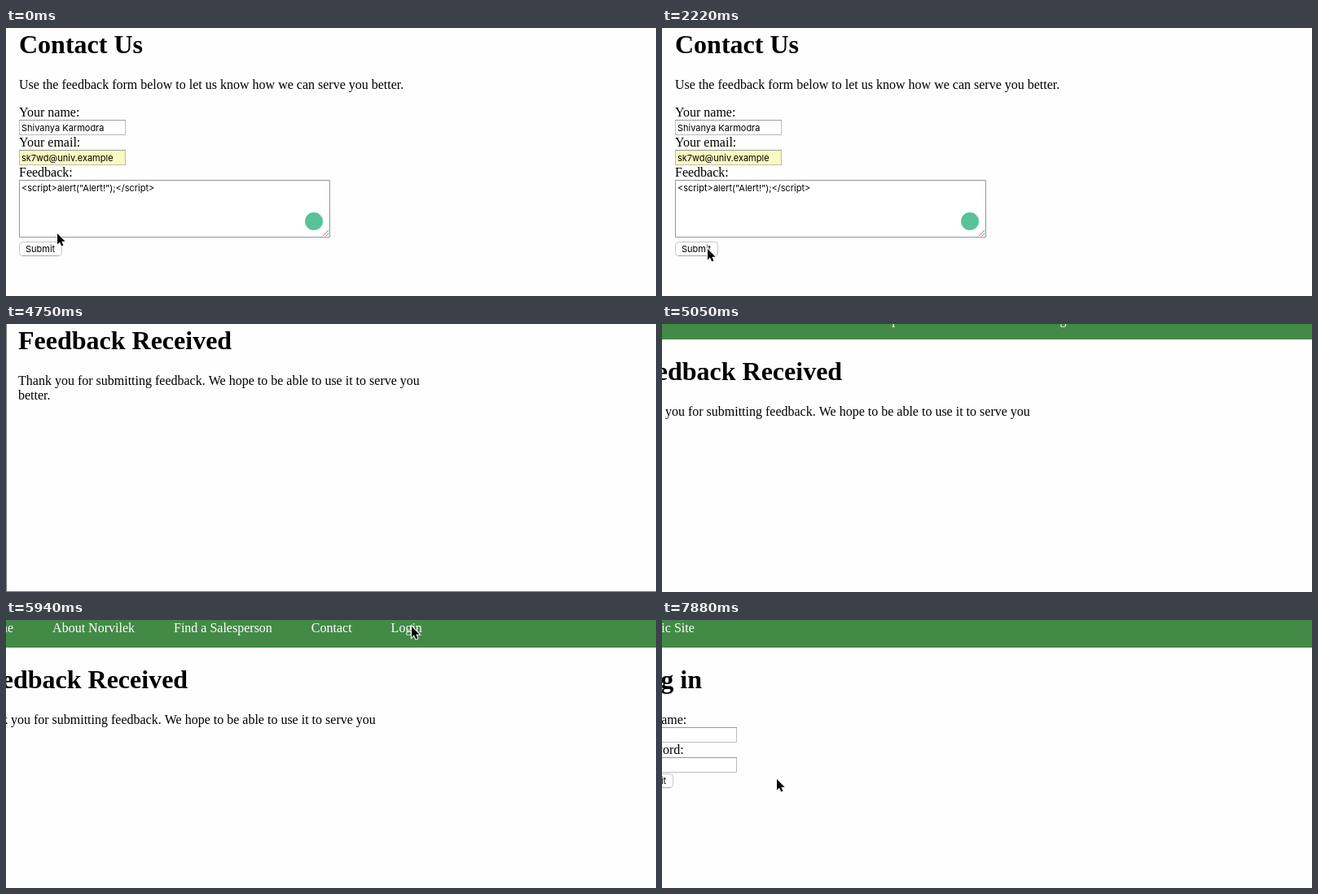
These frames come from a looping animation (798x330 px, 8000 ms). An HTML page with a canvas:

```html
<!DOCTYPE html>
<html lang="en">
<head>
<meta charset="utf-8">
<title>Feedback form</title>
<style>
html, body { margin: 0; height: 100%; overflow: hidden; background: #fefefe; }
canvas { display: block; }
</style>
</head>
<body>
<canvas id="stage" width="798" height="330"></canvas>
<script>
const ctx = document.getElementById('stage').getContext('2d');
const LOOP = 8000, TICK = 148.3;
const SERIF = '16px "Liberation Serif", serif';
const HEADING = 'bold 32px "Liberation Serif", serif';
const UI = '11px Inter, sans-serif';

// Keys are [tick, x, y]; positions change only on whole ticks.
const SCROLL = [[31, 0, 0], [32, -1, 0], [33, -30, 10], [34, -57, 38], [35, -56, 49], [36, -55, 53]];
const POINTER = [
  [0, 63, 253], [4, 56, 268], [9, 56, 268], [12, 60, 298], [15, 56, 272], [20, 56, 272],
  [21, 349, 89], [25, 318, 14], [35, 318, 14],
  [36, 483, 8], [38, 483, 8], [40, 498, 8], [44, 498, 8], [46, 479, 20], [50, 479, 20],
  [51, 300, 110], [53, 141, 196]
];

function at(keys, tick) {
  const next = keys.findIndex(key => key[0] > tick);
  if (next === 0) return keys[0].slice(1);
  if (next < 0) return keys[keys.length - 1].slice(1);
  const [t0, x0, y0] = keys[next - 1], [t1, x1, y1] = keys[next];
  const f = (tick - t0) / (t1 - t0);
  return [Math.round(x0 + (x1 - x0) * f), Math.round(y0 + (y1 - y0) * f)];
}

function text(string, x, y, font = SERIF, color = '#000') {
  ctx.font = font;
  ctx.fillStyle = color;
  ctx.fillText(string, x, y);
}

function box(x, y, w, h, fill, border, radius = 0) {
  ctx.beginPath();
  ctx.roundRect(x + .5, y + .5, w - 1, h - 1, radius);
  ctx.fillStyle = fill;
  ctx.fill();
  ctx.lineWidth = 1;
  ctx.strokeStyle = border;
  ctx.stroke();
}

function line(x0, y0, x1, y1, color) {
  ctx.beginPath();
  ctx.moveTo(x0, y0);
  ctx.lineTo(x1, y1);
  ctx.lineWidth = 1;
  ctx.strokeStyle = color;
  ctx.stroke();
}

function field(label, y, value = '', fill = '#fff') {
  text(label, 16, y);
  box(16, y + 4, 131, 19, fill, '#bcbcbc');
  line(16, y + 4.5, 147, y + 4.5, '#9a9a9a');
  text(value, 19, y + 18, UI);
}

function submitButton(y) {
  box(16, y, 53, 18, '#fff', '#c6c6c6', 4);
  line(20, y + 17.5, 65, y + 17.5, '#a9a9a9');
  text('Submit', 24, y + 13, UI);
}

function menu(items) {
  ctx.fillStyle = '#448a47';
  ctx.fillRect(-100, -119, 1000, 100);
  let x = 25;
  for (const item of items) {
    text(item, x, -38, SERIF, '#fff');
    x += ctx.measureText(item).width + 48;
  }
}

function feedbackArea(focused, caret) {
  if (focused) {
    [[3, '#dcebfb'], [2, '#9cc6f4']].forEach(([d, color]) =>
      box(16 - d, 187 - d, 382 + 2 * d, 71 + 2 * d, color, color, d));
  }
  box(16, 187, 382, 71, '#fff', focused ? '#4f97e6' : '#959595');
  if (focused) box(15, 186, 384, 73, 'transparent', '#5a9fe9', 1);
  const code = '<script>alert("Alert!");<\/script>';
  text(code, 19, 201, UI);
  if (caret) ctx.fillRect(Math.round(19 + ctx.measureText(code).width), 191, 1, 13);
  line(389, 256, 396, 249, '#888');
  line(393, 256, 396, 253, '#888');
  ctx.beginPath();
  ctx.arc(378, 238, 11, 0, 7);
  ctx.fillStyle = '#58c29b';
  ctx.fill();
}

function contactPage(tick) {
  text('Contact Us', 16, 31, HEADING);
  text('Use the feedback form below to let us know how we can serve you better.', 16, 75);
  field('Your name:', 109, 'Shivanya Karmodra');
  field('Your email:', 146, 'sk7wd@univ.example', '#f9f9c0');
  text('Feedback:', 16, 183);
  feedbackArea(tick >= 7 && tick < 12, tick >= 7 && tick < 10);
  submitButton(263);
}

function receivedPage() {
  menu(['Home', 'About Norvilek', 'Find a Salesperson', 'Contact', 'Login']);
  text('Feedback Received', 16, 31, HEADING);
  text('Thank you for submitting feedback. We hope to be able to use it to serve you', 16, 75);
  text('better.', 16, 93);
}

function loginPage() {
  menu(['Public Site']);
  text('Log in', 16, 31, HEADING);
  field('Username:', 75);
  field('Password:', 112);
  submitButton(136);
}

const arrow = new Path2D('M0 0V13.5L3 10.6L5.2 15.4L7.4 14.4L5.3 9.7H9.6Z');

function pointer(x, y) {
  ctx.save();
  ctx.translate(x, y);
  ctx.lineWidth = 2;
  ctx.strokeStyle = '#fff';
  ctx.stroke(arrow);
  ctx.fillStyle = '#000';
  ctx.fill(arrow);
  ctx.restore();
}

function draw(now) {
  const tick = Math.floor((now % LOOP + 5) / TICK);
  ctx.fillStyle = '#fefefe';
  ctx.fillRect(0, 0, 798, 330);

  ctx.save();
  ctx.translate(...at(SCROLL, tick));
  if (tick < 21) contactPage(tick);
  else if (tick < 51) receivedPage();
  else loginPage();
  ctx.restore();

  if (tick === 32) {
    line(.5, 0, .5, 330, '#777');
    line(0, 329.5, 798, 329.5, '#777');
  }
  if (tick < 27 || tick >= 36) pointer(...at(POINTER, tick));
  requestAnimationFrame(() => draw(performance.now()));
}
draw(0);
</script>
</body>
</html>
```
